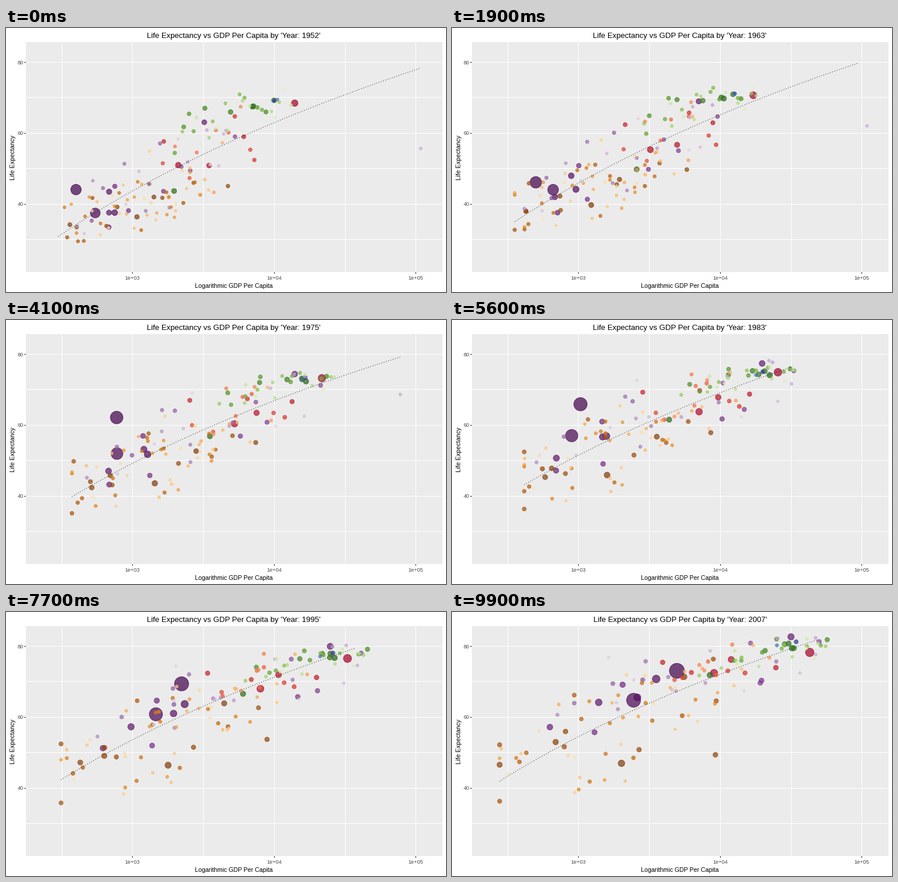
These frames come from a looping animation (750 px wide and 450 px high, 10000 ms). A matplotlib script:

```python
import numpy as np
import matplotlib
import matplotlib.pyplot as plt
from matplotlib.animation import FuncAnimation
from matplotlib.colors import LinearSegmentedColormap
from matplotlib.patches import Rectangle

matplotlib.rcParams["font.family"] = "Liberation Sans"
W, H, DPI, FRAMES = 750, 450, 100, 100
PT = 72 / DPI
L, R, T, B = 34, 744, 24, 416
FIRST, LAST = 1952, 2007
KNOTS = np.arange(FIRST, LAST + 1, 5)
ERAS = (1952, 1982, 2007)
rng = np.random.default_rng(11)

# Ends of the fitted line, as (year, income)
POOREST = [(1952, 299), (1962, 355), (1972, 357), (1982, 424),
           (1992, 347), (2002, 241), (2007, 278)]
RICHEST = [(1952, 108382), (1957, 113523), (1967, 80895), (1972, 109348),
           (1977, 59265), (1982, 31354), (1992, 34933), (2007, 49357)]
# Fitted line: life = level + slope * ln(log10(income) / 3)
LEVEL = [(1952, 43.6), (1963, 45.9), (1983, 51.4), (1990, 53.2), (2007, 54.4)]
SLOPE = [(1952, 67), (1963, 67), (1975, 61.3), (2007, 61.3)]


def along(points, year, log=False):
    years, values = zip(*points)
    return np.interp(year, years, np.log10(values) if log else values)


def eras(values):
    return np.interp(KNOTS, ERAS, values)


def leader(life, income, years=ERAS):
    return (along(zip(years, life), KNOTS),
            along(zip(years, income), KNOTS, log=True))


def crowd(n, life, life_sd, income, income_sd, link):
    """Dots scattered about a moving centre, slowly trading places."""
    angle = np.linspace(0, 0.9, len(KNOTS))

    def scatter():
        a, b = (rng.permutation(np.linspace(-1.7, 1.7, n))[:, None] for _ in "ab")
        wobble = rng.normal(0, 0.05, (n, len(KNOTS)))
        return a * np.cos(angle) + b * np.sin(angle) + wobble

    rich, healthy = scatter(), scatter()
    healthy = link * rich + np.sqrt(1 - link ** 2) * healthy
    ceiling = np.linspace(72.7, 82.3, len(KNOTS))
    lives = np.minimum(eras(life) + eras(life_sd) * healthy, ceiling)
    incomes = np.maximum(eras(income) + eras(income_sd) * rich,
                         along(POOREST, KNOTS, log=True))
    return list(zip(lives, incomes))


def continent(ramp, start_share, leaders, pops, members=(), pop_range=(1, 1)):
    """Dots as (life, log income, population, colour); shade follows population."""
    pops = [*pops, *np.geomspace(*pop_range, len(members))]
    paths = sorted(zip(pops, [*leaders, *members]), key=lambda p: -p[0])
    shades = LinearSegmentedColormap.from_list("ramp", ramp)(np.linspace(0, 1, len(paths)))
    shades[:, 3] = 0.7
    growth = np.linspace(start_share, 1, len(KNOTS))
    return [(*path, pop * growth, shade) for (pop, path), shade in zip(paths, shades)]


dots = [
    *continent(
        ["#7F3B08", "#B35806", "#E08214", "#FDB863", "#FEE0B6"], 0.28,
        [leader((36.3, 45.8, 46.9), (1077, 1577, 2014)),
         leader((41.9, 56, 71.3), (1419, 3503, 5581)),
         leader((34.1, 44.9, 52.9), (362, 578, 691)),
         leader((39.1, 47.8, 46.5), (781, 674, 278)),
         leader((45, 58.2, 49.3), (4725, 8568, 9270))],
        [135, 80, 76, 65, 44],
        crowd(47, (39, 51.5, 55), (4.7, 6.5, 8.5),
              (3.0, 3.13, 3.17), (0.28, 0.34, 0.41), 0.5), (42, 0.3)),
    *continent(
        ["#A50026", "#D73027", "#F46D43", "#FDAE61", "#FEE090"], 0.45,
        [leader((68.4, 74.7, 78.2), (13990, 25010, 42952)),
         leader((50.9, 63.3, 72.4), (2109, 7031, 9066)),
         leader((50.8, 67.4, 76.2), (3478, 9611, 11978))],
        [301, 190, 109],
        crowd(22, (52.5, 66, 73.5), (8, 5.5, 3.6),
              (3.48, 3.78, 3.91), (0.23, 0.24, 0.26), 0.6), (44, 1.1)),
    *continent(
        ["#40004B", "#762A83", "#9970AB", "#C2A5CF", "#E7D4E8"], 0.41,
        [leader((44, 50.5, 44.5, 58.4, 65.5, 73), (400, 576, 488, 613, 962, 4959),
                (1952, 1957, 1962, 1967, 1982, 2007)),
         leader((37.4, 43.6, 56.6, 64.7), (547, 658, 856, 2452),
                (1952, 1962, 1982, 2007)),
         leader((37.5, 56.2, 70.7), (750, 1517, 3541)),
         leader((43.4, 56.2, 65.5), (685, 1443, 2606)),
         leader((37.5, 50, 64.1), (684, 677, 1391)),
         leader((63, 71.4, 77.1, 82.6), (3217, 9848, 19384, 31656),
                (1952, 1967, 1982, 2007)),
         leader((55.6, 67.7, 69.3, 71.3, 77.6), (108382, 109348, 59265, 31354, 47307),
                (1952, 1972, 1977, 1982, 2007))],
        [1319, 1110, 224, 169, 150, 127, 2.5],
        crowd(26, (47, 62.5, 70.5), (7.5, 7, 6.3),
              (3.16, 3.6, 3.72), (0.33, 0.46, 0.5), 0.65), (91, 0.7)),
    *continent(
        ["#276419", "#4D9221", "#7FBC41", "#B8E186", "#E6F5D0"], 0.75,
        [leader((67.5, 73.8, 79.4), (7144, 22032, 32170)),
         leader((43.6, 61, 71.8), (1969, 4241, 8458)),
         leader((67.4, 74.9, 80.7), (7030, 20294, 30470)),
         leader((69.2, 74, 79.4), (9980, 18232, 33203)),
         leader((65.9, 75, 80.5), (4931, 16537, 28570))],
        [82, 71, 61, 61, 58],
        crowd(25, (65.2, 73, 77.8), (4.6, 2.4, 2.6),
              (3.71, 4.15, 4.35), (0.24, 0.2, 0.22), 0.75), (40, 0.4)),
    *continent(
        ["#313695", "#4575B4"], 0.42,
        [leader((69.1, 74.7, 81.2), (10040, 19477, 34435)),
         leader((69.4, 73.8, 80.2), (10557, 17632, 25185))], [20, 4])]
dots.sort(key=lambda d: -d[2][-1])
LIFE, INCOME, POP = (np.array([d[k] for d in dots]) for k in range(3))
COLORS = np.array([d[3] for d in dots])


def px(log_income):
    return L + 241.5 * (log_income - 2.2487)


def py(life):
    return 299.6 - 6.04 * (life - 40)


def at(table, year):
    pos = (year - FIRST) / 5
    i = min(int(pos), len(KNOTS) - 2)
    return table[:, i] + (table[:, i + 1] - table[:, i]) * (pos - i)


fig = plt.figure(figsize=(W / DPI, H / DPI), dpi=DPI, facecolor="white")
ax = fig.add_axes([0, 0, 1, 1])
ax.set(xlim=(0, W), ylim=(H, 0))
ax.axis("off")


def box(x, y, w, h, color, z):
    return ax.add_patch(Rectangle((round(x), round(y)), w, h, color=color, lw=0, zorder=z))


def text(x, y, s, size, color="black", **kw):
    return ax.text(x, y, s, fontsize=size * PT, color=color, **kw)


panel = box(L, T, R - L, B - T, "#EBEBEB", 0)
for u in np.arange(2.5, 5.1, 0.5):
    box(px(u), T, 1, B - T, "white", 1)
for v in range(30, 81, 10):
    box(L, py(v), R - L, 1, "white", 1)
for u in (3, 4, 5):
    box(px(u), B, 1, 3, "#333333", 2)
    text(px(u), 429, f"1e+0{u}", 9.2, "#4D4D4D", ha="center")
for v in (40, 60, 80):
    box(L - 3, py(v), 3, 1, "#333333", 2)
    text(30, py(v) + 3.7, str(v), 9.2, "#4D4D4D", ha="right")
text(388.5, 443, "Logarithmic GDP Per Capita", 10.5, ha="center")
text(12.5, 220.5, "Life Expectancy", 10.7, ha="center", va="center", rotation=90)
title = text(388.5, 17, "", 13.1, ha="center")

bubbles = ax.scatter(px(INCOME[:, 0]), py(LIFE[:, 0]), facecolors=COLORS,
                     edgecolors=COLORS, linewidths=PT, zorder=3)
bubbles.set_clip_path(panel)
fit, = ax.plot([], [], color="black", lw=PT, ls=(0, (1, 3)), zorder=4)


def draw(frame):
    year = FIRST + (LAST - FIRST) * frame / (FRAMES - 1)
    title.set_text(f"Life Expectancy vs GDP Per Capita by 'Year: {year:.0f}'")

    bubbles.set_offsets(np.column_stack([px(at(INCOME, year)), py(at(LIFE, year))]))
    diameter = 2.13 * (2 + 10 * np.sqrt(at(POP, year) / POP.max()))
    bubbles.set_sizes((diameter * PT) ** 2)

    u = np.linspace(along(POOREST, year, log=True), along(RICHEST, year, log=True), 80)
    fit.set_data(px(u), py(along(LEVEL, year) + along(SLOPE, year) * np.log(u / 3)))
    return title, bubbles, fit


anim = FuncAnimation(fig, draw, frames=FRAMES, interval=100, repeat=True,
                     repeat_delay=0, blit=False)
plt.show()
```
